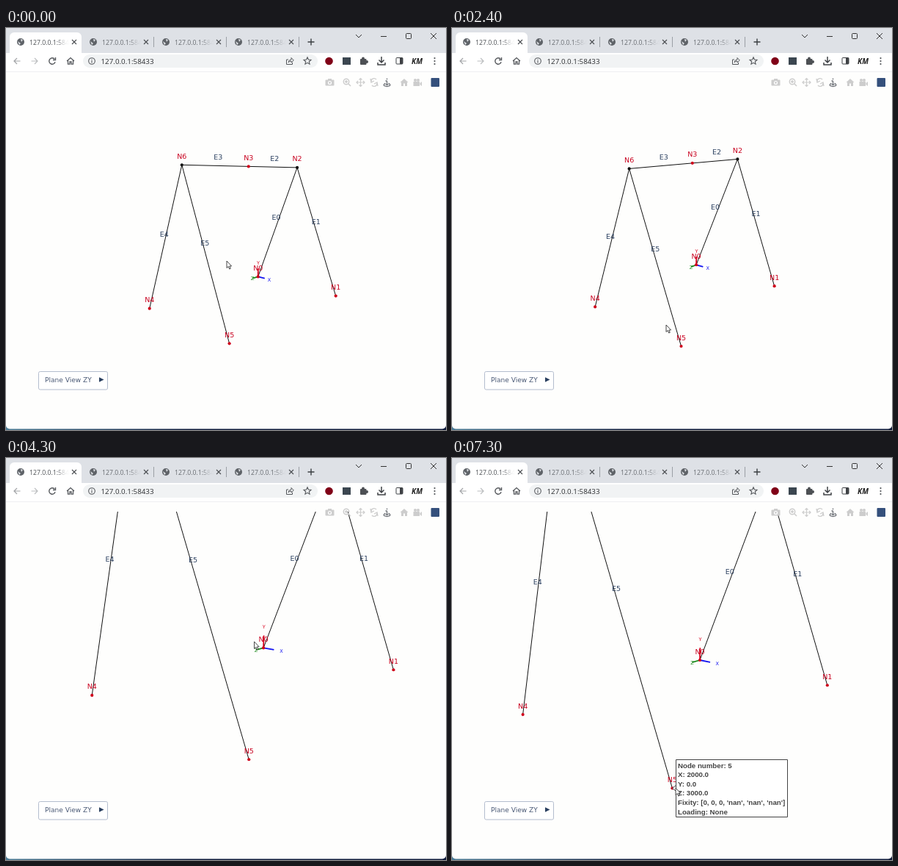
Write an HTML page with a canvas that moves like this. It is 600 by 547 pixels and loops after 8 s.

```html
<!DOCTYPE html>
<html lang="en">
<head>
<meta charset="utf-8">
<title>Frame viewer</title>
<style>
html, body { margin: 0; width: 100%; height: 100%; overflow: hidden; background: #fefefd; }
canvas { display: block; }
</style>
</head>
<body>
<canvas id="stage" width="600" height="547"></canvas>
<script>
const ctx = document.getElementById('stage').getContext('2d');
const UI = '"Open Sans", sans-serif';
const LABEL = '"DejaVu Sans", sans-serif';
const HOVER = 'bold 9.7px "Liberation Sans", Arial, sans-serif';
const RED = '#c8001e', NAVY = '#2a3f5f', ICON = '#55585c', PALE = '#cdcdcd';
const PI = Math.PI;

// Two A-shaped supports, three units apart, joined by a ridge with a middle node
const support = z => [[0, 0, z], [2, 0, z], [1, 2.5, z]];
const NODES = [...support(0), [1, 2.5, 1.5], ...support(3)];
const EDGES = ['02', '12', '23', '36', '46', '56'].map(s => [...s].map(Number));
const AXES = ['X', 'Y', 'Z'];
const AXIS_COLORS = ['#1414f0', '#d8001c', '#1c8a1c'];
const PIVOT = [1.125, 1.33, 2.2];

// Key poses: time, then values
const ORBIT = [
  [0, 45, 9.4], [800, -.3, 16.7], [1500, -19.8, -3.1],
  [1900, -27, -6], [2150, 10, 26], [2400, 40.8, 15.1]
];
const PAN = [[0, 0, 0], [3500, 0, 0], [3800, .264, -1.19], [4700, -.178, -.784], [5000, -.135, -.77]];
const POINTER = [
  [0, 301, 317], [800, 425, 326], [1500, 453, 287], [1900, 474, 272], [2400, 292, 404],
  [3500, 327, 397], [3800, 368, 216], [4700, 315, 277], [5400, 295, 204],
  [5600, 270, 162], [5900, 270, 162], [6000, 292, 212], [6400, 292, 212], [7300, 305, 449]
];

const mix = (a, b, f) => a.map((v, i) => v + (b[i] - v) * f);
const ramp = (t, from, to) => Math.min(1, Math.max(0, (t - from) / (to - from)));

function sample(keys, t) {
  const i = keys.findIndex(k => k[0] > t);
  if (i < 0) return keys[keys.length - 1].slice(1);
  const a = keys[i - 1], b = keys[i];
  return mix(a, b, ramp(t, a[0], b[0])).slice(1);
}

function projector(t) {
  const [yaw, pitch] = sample(ORBIT, t).map(v => v * PI / 180);
  const [panX, panY] = sample(PAN, t);
  const dist = 6.285 - 2.94 * ramp(t, 2700, 3400);
  const c = Math.cos(yaw), s = Math.sin(yaw), cp = Math.cos(pitch), sp = Math.sin(pitch);
  return p => {
    const [x, y, z] = p.map((v, i) => v - PIVOT[i]);
    const w = x * s + z * c;
    const k = 513 / (dist - w * cp - y * sp);
    return [299.5 + k * (x * c - z * s + panX), 284.5 + k * (panY - y * cp + w * sp)];
  };
}

function rect(x, y, w, h, fill, r = 0, edge) {
  ctx.beginPath();
  ctx.roundRect(x, y, w, h, r);
  if (fill) { ctx.fillStyle = fill; ctx.fill(); }
  if (edge) { ctx.strokeStyle = edge; ctx.lineWidth = 1; ctx.stroke(); }
}
function disc(x, y, r, fill) {
  ctx.beginPath();
  ctx.arc(x, y, r, 0, 2 * PI);
  ctx.fillStyle = fill;
  ctx.fill();
}
function ring(x, y, r, color, width = 1.2, from = 0, to = 2 * PI) {
  ctx.beginPath();
  ctx.arc(x, y, r, from, to);
  ctx.strokeStyle = color;
  ctx.lineWidth = width;
  ctx.stroke();
}
function line(a, b, color, width) {
  ctx.beginPath();
  ctx.moveTo(...a);
  ctx.lineTo(...b);
  ctx.strokeStyle = color;
  ctx.lineWidth = width;
  ctx.stroke();
}
function text(s, x, y, font, color, align = 'left') {
  ctx.font = font;
  ctx.fillStyle = color;
  ctx.textAlign = align;
  ctx.fillText(s, x, y);
}
// SVG path around (x, y); a width of 0 leaves out the outline
function icon(x, y, d, color, width = 1.2, fill, turn = 0) {
  ctx.save();
  ctx.translate(x, y);
  ctx.rotate(turn);
  const p = new Path2D(d);
  if (fill) { ctx.fillStyle = fill; ctx.fill(p); }
  if (width) { ctx.strokeStyle = color; ctx.lineWidth = width; ctx.stroke(p); }
  ctx.restore();
}
function gradient(x0, x1, a, b) {
  const g = ctx.createLinearGradient(x0, 0, x1, 0);
  g.addColorStop(0, a);
  g.addColorStop(1, b);
  return g;
}

const ARROW = 'M4.5 0H-4M0 -4L-4 0L0 4';
const STAR = 'M' + Array.from({ length: 10 }, (_, i) => {
  const r = i % 2 ? 2.4 : 5.2, a = i * PI / 5;
  return [r * Math.sin(a), -r * Math.cos(a)];
}).join('L') + 'Z';

function drawTabs() {
  rect(0, 0, 600, 35, '#dee1e6');
  rect(5, 6, 98, 40, '#fff', 6);
  for (let i = 0; i < 4; i++) {
    const x = 20 + i * 99;
    disc(x, 19, 5, '#5f6368');
    icon(x, 19, 'M-4 -1L0 2L-2 4ZM0 -4L3 -3L1 0Z', '', 0, '#dfe2e6');
    const fade = i ? gradient(x + 50, x + 68, '#676b70', '#dee1e600')
                   : gradient(x + 50, x + 68, '#494d51', '#ffffff00');
    text('127.0.0.1:584', x + 12, 22.5, '8.7px ' + UI, fade);
    icon(x + (i ? 72 : 73), 19, 'M-3 -3L3 3M3 -3L-3 3', '#4a4d51', 1.1);
    if (i) line([x + 82.5, 12], [x + 82.5, 26], '#9b9fa5', 1);
  }
  icon(416, 19, 'M-4.5 0H4.5M0 -4.5V4.5', '#3c4043', 1.4);
  icon(481, 11, 'M-4 -2L0 2L4 -2', '#333', 1);
  icon(515, 11, 'M-4 .5H4', '#333', 1);
  rect(545.5, 7.5, 7, 7, null, 1, '#333');
  icon(583, 11, 'M-4 -4L4 4M4 -4L-4 4', '#333', 1);
}

function drawToolbar() {
  rect(0, 34, 600, 25, '#fff');
  icon(15, 45, ARROW, '#a3a5a8');
  icon(39, 45, ARROW, '#bcbec0', 1.2, null, PI);
  ring(63, 45, 4.2, ICON, 1.4, .3, 5.6);
  icon(66, 42, 'M1.5 -2V1.5H-2', ICON, 1.4);
  icon(88, 45, 'M-5 0L0 -4.5L5 0M-3.5 -1V4.2H-1V1H1V4.2H3.5V-1', ICON, 1.3);
  rect(105, 36, 320, 18, '#f1f3f4', 9);
  ring(117, 45, 4.3, ICON, 1.1);
  icon(117, 45, 'M0 -.8V2.6M0 -2.6V-1.5', ICON, 1.1);
  text('127.0.0.1:58433', 129.5, 48.5, '9.8px ' + UI, '#2c2e31');
  icon(387, 45, 'M-2 -2H-4.5V4.5H3.5V2M-2 2Q-1.5 -2 2 -2V-4.5L5.3 -1L2 2V0Q-.5 0 -2 2Z', ICON, 1);
  icon(411, 45, STAR, ICON, 1.1);
  disc(440.5, 45, 5.3, '#800018');
  rect(459, 40, 11, 10, '#3b4650');
  rect(483, 42, 8.5, 8, '#4d5054', 1);
  disc(487, 41.5, 2, '#4d5054');
  disc(492, 46, 2, '#4d5054');
  icon(512, 45, 'M0 -6V2M-3.5 -1.5L0 2L3.5 -1.5M-5 2V5H5V2', '#3f4246', 1.5);
  rect(532, 40.5, 9, 8.5, null, 1, '#3f4246');
  rect(537, 40.5, 4, 8.5, '#3f4246');
  text('KM', 560.5, 48.5, 'italic bold 10px ' + UI, '#222', 'center');
  for (const y of [41, 45, 49]) disc(584.5, y, 1.1, '#4d5054');
  line([0, 59.5], [600, 59.5], '#eeeff1', 1);
}

function drawModebar() {
  rect(435.5, 70.5, 12, 8, PALE, 1);
  rect(439, 69, 5, 3, PALE);
  ring(441.5, 74.5, 2, '#fff');
  ring(464, 73, 3.7, PALE, 1.5);
  icon(464, 73, 'M3 3L6 6M-2 0H2M0 -2V2', PALE, 1.5);
  for (let i = 0; i < 4; i++) icon(483.5, 74, 'M0 0H5.5M3.5 -2L5.5 0L3.5 2', PALE, 1.2, null, i * PI / 2);
  for (let i = 0; i < 2; i++) icon(502, 74, 'M-4 -1A4 4 0 0 1 3 -4M-5 -5L-4 0L0 -2', PALE, 1.3, null, i * PI);
  icon(519.5, 74, 'M0 -2V3M-2 -2H0M-2 3H2M-2 1Q-5 2.5 -4 4.5Q0 6.5 4 4.5Q5 2.5 2 1M0 -5.5V-3.8', '#6b6f75', 1.3);
  icon(543, 74, 'M-5.5 0L0 -5L5.5 0H4V5H1V1.5H-1V5H-4V0Z', '', 0, PALE);
  icon(561, 74, 'M-5.5 -1H3V5H-5.5ZM3.5 1L6 -1V5L3.5 3Z', '', 0, PALE);
  for (const x of [558, 562]) disc(x, 71, 2, PALE);
  rect(579.5, 68, 11.5, 12, '#35507c', 1);
}

function drawButton() {
  rect(44.5, 467.5, 94, 24.5, '#fff', 2, '#b4bdce');
  text('Plane View ZY', 53, 482, '9.05px ' + LABEL, '#4b5a76');
  icon(130, 478.5, 'M-3 -3.3L3.5 0L-3 3.3Z', '', 0, NAVY);
}

function drawModel(at) {
  const pts = NODES.map(at);
  const caption = (s, [x, y], color) => text(s, x, y - 8.5, '9.5px ' + LABEL, color, 'center');
  ctx.save();
  ctx.beginPath();
  ctx.rect(40, 73, 518, 425);
  ctx.clip();
  for (const [a, b] of EDGES) line(pts[a], pts[b], '#111', 1);
  AXES.forEach((name, i) => {
    const along = len => at(AXES.map((_, j) => j === i ? len : 0));
    line(pts[0], along(.2), AXIS_COLORS[i], 1.8);
    const [x, y] = along(name === 'Z' ? .2 : .335);
    text(name, x, y + 2.5, '6.5px ' + LABEL, AXIS_COLORS[i], 'center');
  });
  pts.forEach((p, i) => disc(...p, 2.1, i === 2 || i === 6 ? '#111' : '#d0021b'));
  EDGES.forEach(([a, b], i) => caption('E' + i, at(mix(NODES[a], NODES[b], .5)), NAVY));
  pts.forEach((p, i) => caption('N' + i, p, RED));
  ctx.restore();
}

function drawHover([x, y], lines) {
  ctx.font = HOVER;
  const w = Math.max(...lines.map(s => ctx.measureText(s).width)) + 6;
  const h = lines.length * 12.65 + 2;
  const left = Math.round(x) + 5.5, top = Math.round(y - h / 2) + .5;
  icon(left, y, 'M0 -4L-5 0L0 4Z', '#444', 1, '#fff');
  rect(left, top, Math.round(w), Math.round(h), '#fff', 0, '#444');
  lines.forEach((s, i) => text(s, left + 2.5, top + 11 + i * 12.65, HOVER, '#444'));
}

function draw(t) {
  const at = projector(t);
  rect(0, 0, 600, 547, gradient(0, 250, '#4d7d97', '#101c3c'));
  rect(0, -10, 600, 555.5, '#fefefd', 5);
  drawTabs();
  drawToolbar();
  drawModel(at);
  drawModebar();
  drawButton();
  if (t >= 5500 && t < 6400)
    drawHover(at(mix(NODES[5], NODES[6], .5)), ['Element: 5', 'Nodes: [5, 6]', 'Loading: None']);
  if (t >= 7200)
    drawHover(at(NODES[5]), ['Node number: 5', 'X: 2000.0', 'Y: 0.0', 'Z: 3000.0',
      "Fixity: [0, 0, 0, 'nan', 'nan', 'nan']", 'Loading: None']);
  const [x, y] = sample(POINTER, t);
  icon(x, y, 'M0 0V9.5L2.2 7.5L3.7 11L5.3 10.3L3.8 7H6.6Z', '#333', .9, '#fff');
}

function tick(now) {
  draw(Math.floor(now % 8000 / 100) * 100);
  requestAnimationFrame(tick);
}
requestAnimationFrame(tick);
</script>
</body>
</html>
```
